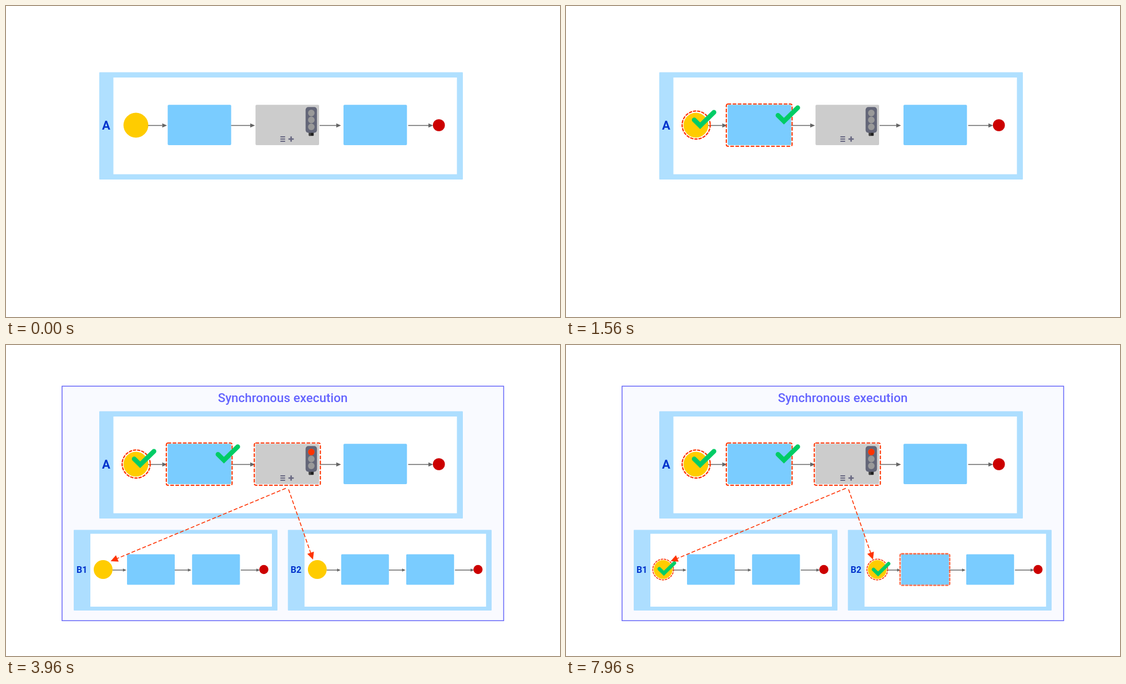
These frames come from a looping animation (998x561 px, 8 s). An HTML page:

```html
<!DOCTYPE html>
<html lang="en">
<head>
<meta charset="utf-8">
<title>Synchronous execution</title>
<style>
  html, body { margin: 0; width: 100%; height: 100%; overflow: hidden; background: #fff; }
  svg { display: block; width: 998px; height: 561px; }
  text { font-family: Roboto, "Liberation Sans", sans-serif; text-anchor: middle; }
  .name { font-weight: 700; fill: #0033cc; }
  .ring { fill: none; stroke: #ff3300; stroke-linecap: round; }
  .check { fill: none; stroke: #00cc66; stroke-width: 8.6; stroke-linecap: round; }
</style>
</head>
<body>
<svg id="stage" viewBox="0 0 998 561"></svg>
<script>
const LOOP = 8000, STEP = 40, REVEAL = 3960;
const stage = document.getElementById('stage');

function add(parent, tag, attrs, text) {
  const el = document.createElementNS('http://www.w3.org/2000/svg', tag);
  for (const key in attrs) el.setAttribute(key, attrs[key]);
  if (text) el.textContent = text;
  parent.appendChild(el);
  return el;
}
const group = (parent, attrs = {}) => add(parent, 'g', attrs);
const circle = (g, cx, cy, r, fill) => add(g, 'circle', { cx, cy, r, fill });

// Boxes are given by their left, top, right and bottom edges.
function box(g, x1, y1, x2, y2, fill, rx = 0, extra = {}) {
  return add(g, 'rect', { x: x1, y: y1, width: x2 - x1, height: y2 - y1, fill, rx, ...extra });
}

function arrow(g, x1, x2, y, head) {
  add(g, 'path', { d: `M${x1} ${y}H${x2 - head}`, stroke: '#666', 'stroke-width': 1.5 });
  add(g, 'path', { d: `M${x2} ${y}l${-head} ${-head * .44}v${head * .88}z`, fill: '#666' });
}

function callArrow(g, x1, y1, x2, y2) {
  const angle = Math.atan2(y2 - y1, x2 - x1) * 180 / Math.PI;
  const length = Math.hypot(x2 - x1, y2 - y1);
  const line = group(g, { transform: `translate(${x1} ${y1}) rotate(${angle})` });
  add(line, 'path', { d: `M0 0H${length - 12}`, stroke: '#ff3300', 'stroke-width': 1.6, 'stroke-dasharray': '7 3.5' });
  add(line, 'path', { d: `M${length} 0l-13 -6.3v12.6z`, fill: '#ff3300' });
}

function ringRound(g, cx, cy, r, width, dash) {
  return add(g, 'circle', { class: 'ring', cx, cy, r, 'stroke-width': width, 'stroke-dasharray': dash });
}

function ringBox(g, x1, y1, x2, y2, width, dash) {
  return box(g, x1, y1, x2, y2, 'none', 3, { class: 'ring', 'stroke-width': width, 'stroke-dasharray': dash });
}

function check(g, x, y, scale = 1) {
  return add(g, 'path', {
    class: 'check', d: 'M-10.7 -10.5L0 0L24.8 -24.3',
    transform: `translate(${x} ${y}) scale(${scale})`
  });
}

const panel = group(stage);
box(panel, 101, 74.3, 896.5, 497.3, '#f9faff', 0, { stroke: '#6464f8', 'stroke-width': 1.5 });
add(panel, 'text', { x: 498.5, y: 103, 'font-size': 22.4, 'font-weight': 500, fill: '#6464ff' }, 'Synchronous execution');

const main = group(stage);
const mainFrame = box(main, 168, 119.5, 823, 313, '#b0e0ff', 1);
box(main, 193.5, 129, 812.3, 303.5, '#fff');
add(main, 'text', { class: 'name', x: 180.5, y: 223, 'font-size': 22 }, 'A');
circle(main, 234, 215, 22.4, '#ffcc00');
box(main, 291.3, 178.3, 405.6, 251, '#7accff', 2);
box(main, 449.5, 178.3, 564, 251, '#ccc', 2);
box(main, 608, 178.3, 722.3, 251, '#7accff', 2);
for (const [x1, x2] of [[256, 290], [405.5, 448.5], [565, 603.5], [724.5, 769.5]]) arrow(main, x1, x2, 215.5, 8.5);
circle(main, 779.8, 215, 10.8, '#cc0000');

for (const y of [236, 240, 244]) box(main, 494.3, y - 1, 502.8, y + 1, '#666680');
add(main, 'path', { d: 'M508.8 240H518.4M513.6 235.2V244.8', stroke: '#666680', 'stroke-width': 2.6 });
box(main, 545.5, 227, 554.3, 234.3, '#222', 1);
box(main, 545.5, 227, 549, 234.3, '#444', 1);
box(main, 539.7, 182.3, 560.2, 228.8, '#636678', 5);
for (const y of [193, 205.5, 218]) circle(main, 550, y, 5.9, '#999');
const redLamp = circle(main, 550, 193, 5.9, '#ff3300');

const startRing = ringRound(main, 234.5, 214.7, 25.3, 2.3, '4 3.57');
const taskRing = ringBox(main, 288.8, 176.8, 407.3, 253, 2.1, '5 4.2');
const callRing = ringBox(main, 447.3, 176.8, 566.3, 253, 2.1, '5 4.2');
const startCheck = check(main, 241.7, 216);
const taskCheck = check(main, 392.6, 207.8);

const details = group(stage);
function subprocess(dx, name) {
  const g = group(details, { transform: `translate(${dx} 0)` });
  box(g, 122, 333.5, 489, 479, '#addeff', 1);
  box(g, 152, 340.5, 479, 472, '#fff');
  add(g, 'text', { class: 'name', x: 136.7, y: 411, 'font-size': 16 }, name);
  circle(g, 175, 405, 17, '#ffcc00');
  box(g, 218, 377.4, 304, 432.6, '#7accff', 1.5);
  box(g, 335.2, 377.4, 421.4, 432.6, '#7accff', 1.5);
  for (const [x1, x2] of [[192, 217], [304, 334], [423, 457.5]]) arrow(g, x1, x2, 406, 6.5);
  circle(g, 464.5, 405, 8.2, '#cc0000');
  return { g, ring: ringRound(g, 175, 405, 18.7, 1.6, '3 2.6') };
}
const b1 = subprocess(0, 'B1');
const b2 = subprocess(385.8, 'B2');
const b1Check = check(details, 176.3, 411.8, .76);
const b2Check = check(details, 562.2, 413, .76);
const b2TaskRing = ringBox(details, 601.8, 376.6, 691.2, 433.5, 2.7, '3.6 3.6');
callArrow(details, 504, 258.5, 188.5, 390);
callArrow(details, 509, 260.5, 553, 387);

// Each fade: start, end, elements.
const fades = [
  [360, 800, startRing],
  [520, 800, startCheck],
  [1160, 1560, taskRing],
  [1280, 1560, taskCheck],
  [1960, 2440, callRing, redLamp],
  [4800, 6100, b1.ring, b2.ring],
  [5600, 6200, b1Check, b2Check],
  [7040, 8400, b2TaskRing]
];

function draw(now) {
  const t = Math.floor((now % LOOP) / STEP) * STEP;
  for (const [from, to, ...els] of fades) {
    const alpha = Math.min(1, Math.max(0, (t - from) / (to - from)));
    for (const el of els) el.setAttribute('opacity', alpha);
  }
  const open = t >= REVEAL;
  for (const g of [panel, details]) g.setAttribute('visibility', open ? 'visible' : 'hidden');
  mainFrame.setAttribute('fill', open ? '#addeff' : '#b0e0ff');
}

const begin = performance.now();
function tick() {
  draw(performance.now() - begin);
  requestAnimationFrame(tick);
}
draw(0);
requestAnimationFrame(tick);
</script>
</body>
</html>
```
